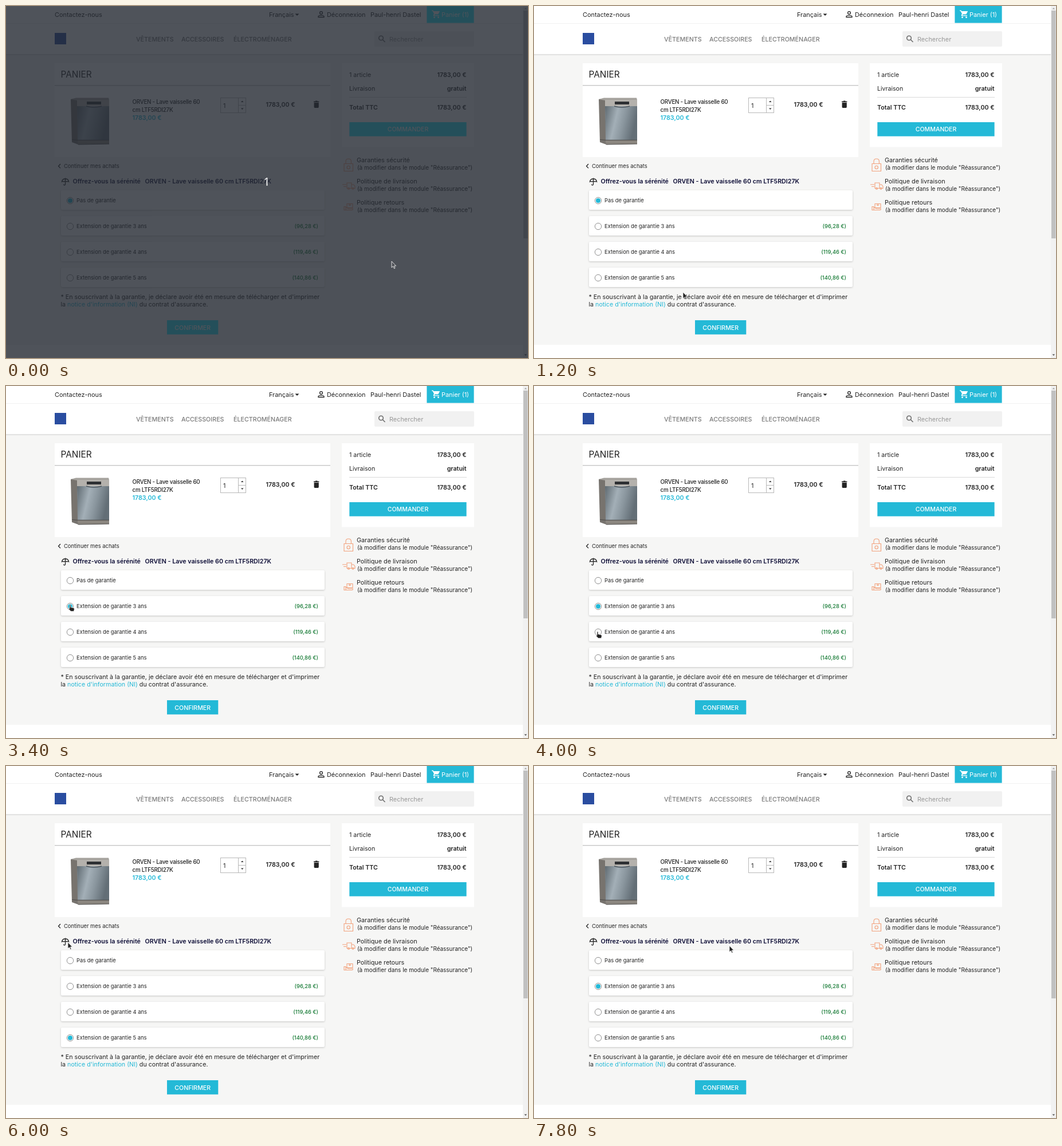
Recreate the animation shown at these times as an HTML page. Size 911 by 615 pixels, loop 8 s.

```html
<!DOCTYPE html>
<html lang="fr">
<head>
<meta charset="utf-8">
<title>Panier</title>
<style>
  html, body { margin: 0; width: 100%; height: 100%; overflow: hidden; background: #fff; }
  svg { display: block; }
  text { font: 400 10.8px Inter, "Open Sans", sans-serif; fill: #232323; white-space: pre; }
  .top { font-size: 10.9px; }
  .nav { font-weight: 500; font-size: 10.7px; fill: #7a7a7a; }
  .title { font-size: 15.4px; }
  .product { font-weight: 500; font-size: 9.8px; letter-spacing: -.25px; }
  .sum { font-size: 10.6px; }
  .bold { font-weight: 600; font-size: 10.7px; }
  .heading { font-weight: 600; font-size: 10.7px; fill: #0c0c35; }
  .small { font-size: 9.4px; }
  .cost { font-weight: 500; font-size: 9.3px; fill: #157a34; text-anchor: end; }
  .button { font-weight: 500; font-size: 10.6px; fill: #fff; text-anchor: middle; }
  .note { font-size: 10.68px; }
  .hint { font-size: 9.95px; }
  .end { text-anchor: end; }
  .teal { fill: #24b9d7; }
  .white { fill: #fff; }
  .card { fill: #fff; filter: drop-shadow(0 1px 1.5px rgba(0, 0, 0, .2)); }
  .line { fill: none; stroke: #232323; stroke-width: 1.3; }
  .orange { fill: none; stroke: #f2a27c; stroke-width: 1.1; }

  .dim, .cursor, .arrow, .hand, .dot, rect.teal { animation: 8s step-end infinite; }
  .dim { animation-name: dim; }
  rect.teal { animation-name: glow; }
  .cursor { animation-name: move; }
  .arrow { animation-name: arrow; }
  .hand { animation-name: hand; }
  .dot { fill: #24b9d7; }
  .none { animation-name: none-on; }
  .three { animation-name: three-on; }
  .four { animation-name: four-on; }
  .five { animation-name: five-on; }

  @keyframes dim { 0% { opacity: 1; } 2.5%, 100% { opacity: 0; } }
  @keyframes glow { 0% { fill: #28eeff; } 2.5%, 100% { fill: #24b9d7; } }
  @keyframes none-on { 0% { opacity: 1; } 42.5%, 100% { opacity: 0; } }
  @keyframes three-on { 0%, 52.5% { opacity: 0; } 42.5%, 87.5%, 100% { opacity: 1; } }
  @keyframes four-on { 0%, 60%, 100% { opacity: 0; } 52.5% { opacity: 1; } }
  @keyframes five-on { 0%, 87.5%, 100% { opacity: 0; } 60% { opacity: 1; } }
  @keyframes hand { 0%, 75%, 90%, 100% { opacity: 0; } 35%, 80% { opacity: 1; } }
  @keyframes arrow { 0%, 75%, 90%, 100% { opacity: 1; } 35%, 80% { opacity: 0; } }

  /* The pointer is sampled five times a second: 2.5% is one step. */
  @keyframes move {
    0% { transform: translate(673px, 446px); }
    2.5% { transform: translate(638px, 439px); }
    5% { transform: translate(585px, 320px); }
    7.5% { transform: translate(430px, 225px); }
    10% { transform: translate(190px, 245px); }
    12.5% { transform: translate(100px, 400px); }
    15% { transform: translate(260px, 500px); }
    17.5% { transform: translate(480px, 512px); }
    20% { transform: translate(620px, 410px); }
    22.5% { transform: translate(540px, 260px); }
    25% { transform: translate(340px, 217px); }
    27.5% { transform: translate(150px, 265px); }
    30% { transform: translate(89px, 370px); }
    32.5% { transform: translate(96px, 369px); }
    35% { transform: translate(107px, 380px); }
    37.5% { transform: translate(109px, 382px); }
    42.5% { transform: translate(109px, 382px); animation-timing-function: steps(3); }
    50% { transform: translate(108px, 429px); }
    55% { transform: translate(110px, 462px); }
    57.5% { transform: translate(109px, 477px); }
    65% { transform: translate(110px, 470px); animation-timing-function: steps(2); }
    70% { transform: translate(110px, 387px); }
    72.5% { transform: translate(110px, 345px); }
    75% { transform: translate(108px, 308px); }
    77.5% { transform: translate(107px, 318px); }
    80% { transform: translate(109px, 345px); }
    82.5% { transform: translate(110px, 372px); }
    85% { transform: translate(109px, 382px); }
    90% { transform: translate(150px, 360px); }
    92.5% { transform: translate(240px, 325px); }
    95% { transform: translate(315px, 304px); }
    97.5%, 100% { transform: translate(341px, 314px); }
  }
</style>
</head>
<body>
<svg width="911" height="615" viewBox="0 0 911 615">
  <defs>
    <linearGradient id="steel" x2="1" y2=".25">
      <stop offset="0" stop-color="#5f6a71"/>
      <stop offset=".4" stop-color="#a3afb7"/>
      <stop offset=".65" stop-color="#8b979f"/>
      <stop offset="1" stop-color="#636e76"/>
    </linearGradient>
    <linearGradient id="shade" x2="0" y2="1">
      <stop offset="0" stop-color="#d9d9d9"/>
      <stop offset="1" stop-color="#f6f6f5"/>
    </linearGradient>
    <g id="row">
      <rect class="card" x="96" y="322" width="460" height="34" rx="2"/>
      <circle cx="112" cy="340" r="5.7" fill="#fff" stroke="#858585" stroke-width=".9"/>
    </g>
    <path id="pointer" d="M0 0V11L2.6 8.7 4.4 12.7 6 12 4.3 8.1H7.6z"/>
  </defs>

  <rect width="902" height="615" fill="#fff"/>
  <rect y="84" width="902" height="508" fill="#f6f6f5"/>
  <rect y="84" width="902" height="3" fill="url(#shade)"/>
  <rect y="30" width="902" height="1" fill="#f1f1f1"/>

  <!-- Header -->
  <text class="top" x="85" y="18.5">Contactez-nous</text>
  <text class="top" x="459" y="18.5">Français</text>
  <path d="M504.500 13.500h7l-3.500 3.500z" fill="#232323"/>
  <g class="line">
    <circle cx="550" cy="12" r="2.4"/>
    <path d="M545 19.500v-1.200q0-2 5-2t5 2v1.200z"/>
  </g>
  <text class="top" x="560" y="18.5">Déconnexion</text>
  <text class="top" x="636" y="18.5">Paul-henri Dastel</text>
  <rect class="teal" x="734.400" width="82.200" height="29.600"/>
  <g class="white">
    <path d="M743 7.500h2.500l.7 1.500h11l-3 5.600h-5.700l-.9 1.600h8.400v1.300h-9.500q-1.400-.6-.6-1.900l1.100-1.900-2.500-4.900h-1.500z"/>
    <circle cx="747.500" cy="19.800" r="1.400"/><circle cx="754.500" cy="19.800" r="1.400"/>
  </g>
  <text class="top white" x="760" y="18.5">Panier (1)</text>

  <rect x="85" y="47" width="20" height="20" fill="#2a4da0"/>
  <text class="nav" x="227" y="61.500">VÊTEMENTS</text>
  <text class="nav" x="306" y="61.500">ACCESSOIRES</text>
  <text class="nav" x="397" y="61.500">ÉLECTROMÉNAGER</text>
  <rect x="643" y="44" width="174" height="27" rx="2" fill="#f1f1f1"/>
  <g fill="none" stroke="#6d6d6d" stroke-width="1.600">
    <circle cx="654.500" cy="56" r="3.800"/><path d="M657.300 58.800l4.200 4.200"/>
  </g>
  <text class="top" x="669" y="61.500" style="fill:#999">Rechercher</text>

  <!-- Cart -->
  <rect x="85" y="100" width="481" height="164" fill="#fff"/>
  <text class="title" x="95.500" y="125">PANIER</text>
  <rect x="85" y="138" width="481" height="1.500" fill="#c9c9c9"/>
  <g>
    <path d="M113 163l11-2 2 81-11-4z" fill="#77736e"/>
    <path d="M113 163l9-2.500h57l1 3.500-56 1z" fill="#a5a29d"/>
    <path d="M124 164h56v11h-56z" fill="#b4b1ac"/>
    <path d="M124 175h56v59h-55z" fill="url(#steel)"/>
    <path d="M125 234h55v7l-54 1z" fill="#8b867f"/>
    <path d="M115 233.500l10 .8h55M126 242l54-1" fill="none" stroke="#4b4a49"/>
    <rect x="141" y="167" width="25" height="5" fill="#2e3033"/>
    <path d="M140 175q13 4 27 0" fill="none" stroke="#4e575e" stroke-width="1.500"/>
  </g>
  <text class="product" x="220.500" y="171">ORVEN - Lave vaisselle 60</text>
  <text class="product" x="220.500" y="185">cm LTF5RDI27K</text>
  <text class="bold teal" x="220.500" y="198.500">1783,00 €</text>
  <g fill="#fff" stroke="#b8b8b8" stroke-width="1">
    <rect x="374.500" y="160.500" width="44" height="26"/>
    <path d="M405.500 160.500v26M405.500 173.500h13"/>
  </g>
  <path d="M410 168l2.300-2.500 2.300 2.500zM410 178.500l2.300 2.500 2.300-2.500z" fill="#333"/>
  <text x="379" y="178">1</text>
  <text class="bold" x="453.500" y="176">1783,00 €</text>
  <path d="M537 166.500h2.500l.8-.9h2.800l.8.900h2.500v1.500h-9.400zM537.600 168.800h8.200v7.800q0 1.400-1.400 1.400h-5.400q-1.400 0-1.400-1.400z" fill="#232323"/>

  <!-- Summary -->
  <rect x="586" y="100" width="231" height="146.500" fill="#fff"/>
  <text class="sum" x="599" y="124">1 article</text>
  <text class="bold end" x="803.500" y="124">1783,00 €</text>
  <text class="sum" x="599" y="148">Livraison</text>
  <text class="bold end" x="803.500" y="148">gratuit</text>
  <rect x="599" y="159" width="205" height="1" fill="#dadada"/>
  <text class="bold" x="599" y="181">Total TTC</text>
  <text class="bold end" x="803.500" y="181">1783,00 €</text>
  <rect class="teal" x="599.300" y="203" width="204.300" height="24.600"/>
  <text class="button" x="701.500" y="219.300">COMMANDER</text>

  <!-- Reassurance -->
  <g class="orange">
    <path d="M590 275.500h15.500v13H590zM593 275.500v-4q0-4.500 4.700-4.500t4.700 4.500v4"/>
    <circle cx="597.700" cy="282" r="2.700"/>
    <path d="M587 312h7M589 315.500h5M595 309h8v9.500h-8zM603 312h3.500l2.500 3v3.500h-6"/>
    <circle cx="598" cy="319" r="1.500"/><circle cx="605.500" cy="319" r="1.500"/>
    <path d="M595 345.500h10v7h-10zM599 345.500v3h2v-3M590 350.500h3v6h-3zM593 352l5 2h7q1 2-1 2.500H593"/>
  </g>
  <text x="612" y="273">Garanties sécurité</text>
  <text x="612" y="310">Politique de livraison</text>
  <text x="612" y="347">Politique retours</text>
  <text class="hint" x="613" y="285.700">(à modifier dans le module "Réassurance")</text>
  <text class="hint" x="613" y="322.700">(à modifier dans le module "Réassurance")</text>
  <text class="hint" x="613" y="359.700">(à modifier dans le module "Réassurance")</text>

  <!-- Warranty -->
  <path class="line" d="M95 276l-3.500 3.700 3.500 3.700"/>
  <text class="small" x="101" y="282.500">Continuer mes achats</text>
  <path class="line" d="M97.500 307q.5-5 6-5t6 5q-1.500-1.200-3 0-1.500-1.200-3 0-1.500-1.200-3 0-1.500-1.200-3 0zM103.500 300.500v11q0 1.500-1.500 1.500t-1.500-1.500"/>
  <text class="heading" x="116.500" y="310.300">Offrez-vous la sérénité</text>
  <text class="heading" x="242.500" y="310.300">ORVEN - Lave vaisselle 60 cm LTF5RDI27K</text>
  <g>
    <use href="#row"/>
    <circle class="dot none" cx="112" cy="340" r="4.100"/>
    <text class="small" x="123" y="342.500">Pas de garantie</text>
  </g>
  <g transform="translate(0 45)">
    <use href="#row"/>
    <circle class="dot three" cx="112" cy="340" r="4.100"/>
    <text class="small" x="123" y="342.500">Extension de garantie 3 ans</text>
    <text class="cost" x="545" y="342.500">(96,28 €)</text>
  </g>
  <g transform="translate(0 90)">
    <use href="#row"/>
    <circle class="dot four" cx="112" cy="340" r="4.100"/>
    <text class="small" x="123" y="342.500">Extension de garantie 4 ans</text>
    <text class="cost" x="545" y="342.500">(119,46 €)</text>
  </g>
  <g transform="translate(0 135)">
    <use href="#row"/>
    <circle class="dot five" cx="112" cy="340" r="4.100"/>
    <text class="small" x="123" y="342.500">Extension de garantie 5 ans</text>
    <text class="cost" x="545" y="342.500">(140,86 €)</text>
  </g>
  <text class="note" x="95.500" y="512">* En souscrivant à la garantie, je déclare avoir été en mesure de télécharger et d'imprimer</text>
  <text class="note" x="95.500" y="525">la <tspan class="teal">notice d'information (NI)</tspan> du contrat d'assurance.</text>
  <rect class="teal" x="281" y="549" width="89.300" height="24.800"/>
  <text class="button" x="325.700" y="565.500">CONFIRMER</text>

  <!-- Scrollbar -->
  <rect x="902" width="9" height="615" fill="#f1f1f1"/>
  <rect x="903" y="8" width="7.500" height="398" fill="#c1c1c1"/>
  <path d="M904.500 5.500l2.300-2.500 2.300 2.500z" fill="#a3a3a3"/>
  <path d="M904.500 608.500l2.300 2.500 2.300-2.500z" fill="#505050"/>

  <g class="cursor" stroke="#fff" stroke-width=".7" stroke-linejoin="round">
    <use class="arrow" href="#pointer" fill="#222"/>
    <path class="hand" fill="#222" d="M2 1c0-1.300 2-1.300 2 0v3.600l4.400.9q2 .5 1.900 2l-.8 4.200H4.200L.4 7.700Q0 6.200 2 6.800z"/>
  </g>

  <g class="dim">
    <rect width="911" height="615" fill="#242931" fill-opacity=".8"/>
    <use href="#pointer" transform="translate(673 446)" fill="#4b4e54" stroke="#eee" stroke-width=".9"/>
    <text x="455" y="314" style="font:500 20px 'Noto Sans', sans-serif;fill:#fff;text-anchor:middle">1</text>
  </g>
</svg>
</body>
</html>
```
